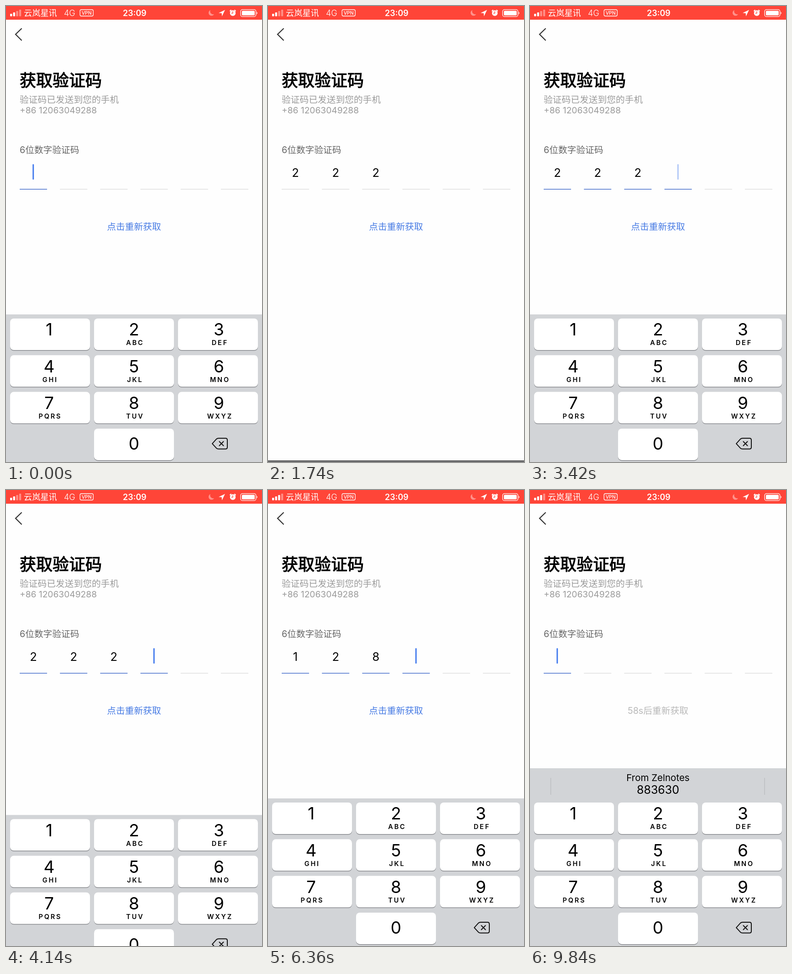
Write an HTML page that moves like this. It is 561 px wide and 998 px high and loops after 9900 ms.

```html
<!DOCTYPE html>
<html lang="zh-CN">
<head>
<meta charset="utf-8">
<style>
html, body { margin: 0; width: 100%; height: 100%; overflow: hidden; background: #fff; }
svg { display: block; width: 100vw; height: 100vh; }
text { font-family: Inter, "Noto Sans CJK SC", "Noto Sans CJK", sans-serif; }
.mid { text-anchor: middle; }
</style>
</head>
<body>
<svg viewBox="0 0 561 998" preserveAspectRatio="none">
  <rect width="561" height="998" fill="#fefefe"/>
  <rect y="995" width="561" height="3"/>

  <rect width="561" height="30" fill="#ff4538"/>
  <g id="bars" fill="#fff"></g>
  <g fill="#fff">
    <text x="39" y="22" font-size="18.2">云岚星讯</text>
    <text x="127" y="21.5" font-size="18" font-weight="300">4G</text>
    <text class="mid" x="176.7" y="19" font-size="10.5" font-weight="500">VPN</text>
    <text class="mid" x="282" y="21.5" font-size="18" font-weight="600">23:09</text>
    <path d="M448 9a6.4 6.4 0 1 0 8 9a6.6 6.6 0 0 1-8-9z" opacity=".42"/>
    <path d="M480 8.5L466 15.3L472.7 15.8L473.3 22.5Z"/>
    <circle cx="497" cy="15.5" r="6.2"/>
    <rect x="517" y="10.5" width="28" height="10" rx="1.5"/>
    <path d="M549.5 12.8q3 2.7 0 5.4z"/>
  </g>
  <g fill="none" stroke="#fff" stroke-width="1.3">
    <rect x="162.2" y="8" width="29" height="14" rx="3"/>
    <rect x="514.2" y="7.8" width="33.5" height="15.4" rx="4"/>
    <path d="M490.5 11.5l3-3M503.5 11.5l-3-3" stroke-width="2"/>
    <path d="M497 11.5v4.3h-3.3" stroke="#ff4538"/>
  </g>

  <path d="M34.5 49L21 62L34.5 75.5" fill="none" stroke="#333" stroke-width="2.3"/>
  <text x="30" y="176" font-size="36" stroke="#000" stroke-width="1.1">获取验证码</text>
  <g fill="#9b9b9b">
    <text x="30" y="212" font-size="19.75">验证码已发送到您的手机</text>
    <text x="30" y="235" font-size="19.2">+86 12063049288</text>
  </g>
  <text x="30" y="322" font-size="19.7" fill="#666">6位数字验证码</text>
  <g id="cells"></g>
  <rect id="caret" y="346" width="3" height="34" rx="1.5" fill="#477eee"/>
  <text id="resend" class="mid" x="280.5" y="490" font-size="19.75"></text>

  <g id="keyboard">
    <rect y="675" width="561" height="323" fill="#d2d4d7"/>
    <g id="hint">
      <rect y="609" width="561" height="67" fill="#d2d4d7"/>
      <path d="M45.5 630v37M514 630v37" stroke="#b9bbbe" stroke-width="1.3"/>
      <text class="mid" x="280.5" y="637" font-size="20.5">From Zelnotes</text>
      <text class="mid" x="280.5" y="665" font-size="25">883630</text>
    </g>
    <g id="keys"></g>
    <g fill="none" stroke="#111" stroke-width="2" stroke-linecap="round" stroke-linejoin="round">
      <path d="M452 957.8L461 947.8Q463 946 466 946H481Q485 946 485 950V965.5Q485 969.5 481 969.5H466Q463 969.5 461 967.7Z"/>
      <path d="M467.5 953.3l9 9m0-9l-9 9"/>
    </g>
  </g>
</svg>
<script>
const LOOP = 9900, KB_H = 323, PITCH = 88.2;
const $ = id => document.getElementById(id);
function add(parent, tag, attrs, text = '') {
  const el = document.createElementNS('http://www.w3.org/2000/svg', tag);
  for (const k in attrs) el.setAttribute(k, attrs[k]);
  el.textContent = text;
  return parent.appendChild(el);
}

// Entry: start time, digits, whether the field has focus
const edits = [
  [300, '2', 1], [560, '22', 1], [820, '222', 1],
  [1320, '222', 0], [1900, '222', 1], [3530, '222', 0], [3936, '222', 1],
  [5060, '22', 1], [5280, '2', 1], [5460, '', 1],
  [5860, '1', 1], [6080, '12', 1], [6320, '128', 1], [6450, '128', 1],
  [6980, '12', 1], [7320, '1', 1], [7660, '', 1]
];

const bars = [0, 1, 2, 3].map(i =>
  add($('bars'), 'rect', { x: 9 + i * 6.6, y: 17 - i * 3, width: 4.4, height: 5.5 + i * 3, rx: 1 }));

const cells = [0, 1, 2, 3, 4, 5].map(i => ({
  line: add($('cells'), 'rect', { x: 30 + i * PITCH, y: 400.2, width: 60, height: 1.7 }),
  digit: add($('cells'), 'text', { x: 60 + i * PITCH, y: 373.5, 'font-size': 25.5, class: 'mid' })
}));

const letters = ['', 'ABC', 'DEF', 'GHI', 'JKL', 'MNO', 'PQRS', 'TUV', 'WXYZ'];
function key(col, row, num, sub) {
  const x = 9 + col * 184, y = 684 + row * 80.3, mid = 94.5 + col * 186, g = $('keys');
  add(g, 'rect', { x, y: y + 1.5, width: 175, height: 69, rx: 8, fill: '#898b8f' });
  add(g, 'rect', { x, y, width: 175, height: 69, rx: 8, fill: '#fff' });
  add(g, 'text', { x: mid, y: y + (row < 3 ? 37.3 : 46.5), 'font-size': 37, class: 'mid' }, num);
  add(g, 'text', { x: mid + 2.4, y: y + 58.3, 'font-size': 14.5, 'font-weight': 600,
    'letter-spacing': 2.8, class: 'mid' }, sub);
}
letters.forEach((s, i) => key(i % 3, Math.floor(i / 3), i + 1, s));
key(1, 3, 0, '');

const ease = p => (1 - Math.cos(Math.PI * Math.min(1, Math.max(0, p)))) / 2;

// Solid after an edit, then a soft blink
function caretAlpha(age) {
  if (age < 510) return 1;
  const p = (age - 510) % 900;
  return p < 440 ? 1 - ease(p / 200) : ease((p - 440) / 180);
}

// Critically damped slide
function keyboardY(t) {
  const move = edits.findLast((e, i) => e[0] <= t && i && e[2] !== edits[i - 1][2]);
  if (!move) return 0;
  const s = (t - move[0]) / 1000 * 18.26, rest = (1 + s) * Math.exp(-s);
  return KB_H * (move[2] ? rest : 1 - rest);
}

function draw(t) {
  const last = edits[edits.length - 1];
  const [start, digits, focus] =
    edits.findLast(e => e[0] <= t) || [last[0] - LOOP, last[1], last[2]];
  const at = digits.length;
  cells.forEach((c, i) => {
    c.digit.textContent = digits[i] || '';
    c.line.setAttribute('fill', focus && i <= at ? '#5c80d2' : '#e3e3e3');
  });
  $('caret').setAttribute('x', 58.2 + at * PITCH);
  $('caret').setAttribute('opacity', focus ? caretAlpha(t - start) : 0);

  const waiting = t >= 8400;
  $('resend').textContent = waiting ? (t < 9360 ? 59 : 58) + 's后重新获取' : '点击重新获取';
  $('resend').setAttribute('fill', waiting ? '#b9b9b9' : '#477be4');

  const signal = t < 5880 ? 2 : 3;
  bars.forEach((b, i) => b.setAttribute('opacity', i < signal ? 1 : .4));
  $('hint').setAttribute('visibility', t >= 9840 ? 'visible' : 'hidden');
  $('keyboard').setAttribute('transform', `translate(0 ${keyboardY(t)})`);
}

const begin = performance.now();
function tick() {
  draw((performance.now() - begin) % LOOP);
  requestAnimationFrame(tick);
}
tick();
</script>
</body>
</html>
```
